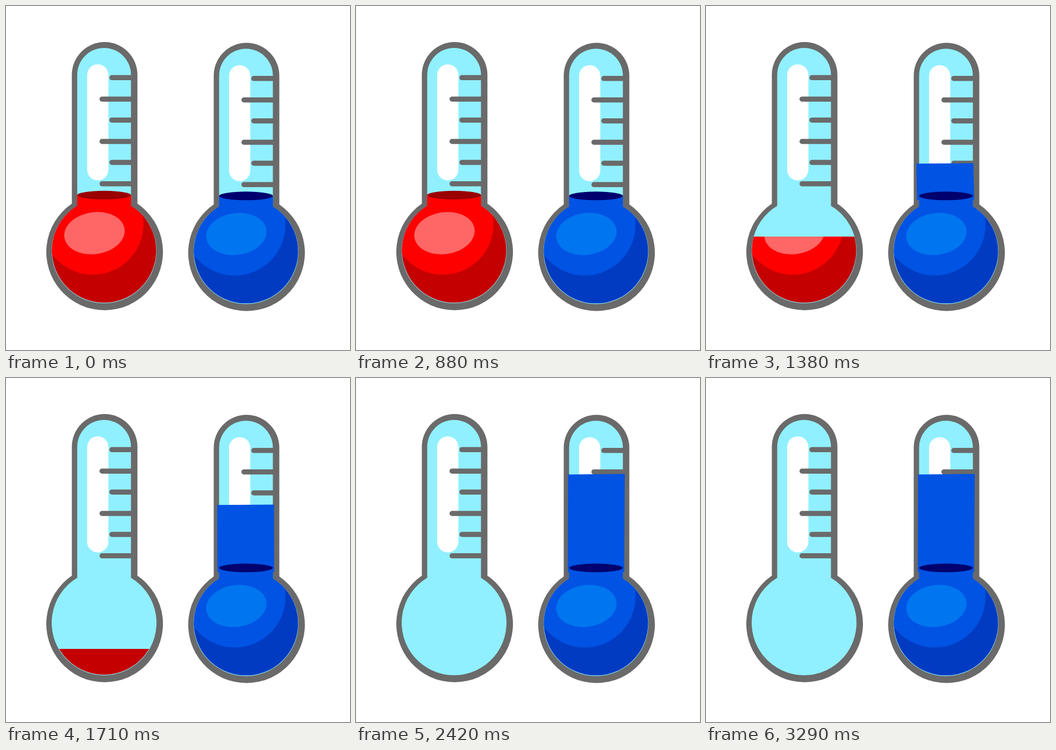
These frames come from a looping animation (640 px wide and 640 px high, 3330 ms). An HTML page:

```html
<!DOCTYPE html>
<html lang="en">
<head>
<meta charset="utf-8">
<title>Two thermometers</title>
<style>
  html, body {
    margin: 0;
    width: 100%;
    height: 100%;
    overflow: hidden;
    background: #fff;
  }
  .layer {
    position: absolute;
    left: 0;
    top: 0;
    width: 640px;
    height: 640px;
  }
  .hot  { --body: #f00; --shade: #c40000; --shine: #f66; --top: #9b0000; }
  .cold { --body: #0053e3; --shade: #003bc2; --shine: #0075f0; --top: #00006e; }

  .drain { animation: drain 3330ms infinite; }
  .column {
    background: #0053e3;
    animation: rise 3330ms infinite;
  }

  /* 25 steps at 24 per second, starting after one second */
  @keyframes drain {
    0% {
      clip-path: inset(340px 0px 0px 0px);
      animation-timing-function: steps(1, end);
    }
    30.03% {
      clip-path: inset(344.6px 0px 0px 0px);
      animation-timing-function: steps(25, end);
    }
    61.26%, 100% { clip-path: inset(579px 0px 0px 0px); }
  }
  @keyframes rise {
    0% {
      clip-path: polygon(392px 361px, 499px 361px, 499px 361px, 392px 361px);
      animation-timing-function: steps(1, end);
    }
    30.03% {
      clip-path: polygon(389.5px 357.4px, 496px 356.5px, 499px 361px, 392px 361px);
      animation-timing-function: steps(25, end);
    }
    61.26%, 100% {
      clip-path: polygon(394.5px 179.4px, 500px 178.4px, 499px 361px, 394px 361px);
    }
  }
</style>
</head>
<body>
<svg class="layer" viewBox="0 0 640 640">
  <defs>
    <g id="glass">
      <path fill="#6a6a6a" d="M122.5 367.8V128a61 61 0 0 1 122 0V367.8A108.5 108.5 0 1 1 122.5 367.8Z"/>
      <path fill="#90f0ff" d="M132.5 371.8V128a50 50 0 0 1 100 0V371.8A97.5 97.5 0 1 1 132.5 371.8Z"/>
      <rect x="151" y="108.5" width="39.5" height="216" rx="19.75" fill="#fff"/>
      <path stroke="#6a6a6a" stroke-width="9.5" stroke-linecap="round"
        d="M197 133.3H232M178.7 173.2H236M197 212.2H232M178.7 252H236M197 291H232M178.7 330.8H236"/>
    </g>
    <clipPath id="fill">
      <path d="M132.5 371.8V352H232.5V371.8A97 97 0 1 1 132.5 371.8Z"/>
    </clipPath>
    <g id="liquid">
      <g clip-path="url(#fill)">
        <rect x="80" y="345" width="210" height="215" fill="var(--shade)"/>
        <circle cx="161.5" cy="405.5" r="94.5" fill="var(--body)"/>
      </g>
      <ellipse rx="56.5" ry="39" transform="translate(164.6 422.6) rotate(-8)" fill="var(--shine)"/>
    </g>
    <ellipse id="surface" cx="182.5" cy="351.8" rx="50" ry="8" fill="var(--top)"/>
  </defs>
  <use href="#glass"/>
  <g class="cold" transform="translate(264 1.5)">
    <use href="#glass"/>
    <use href="#liquid"/>
  </g>
</svg>

<svg class="layer hot drain" viewBox="0 0 640 640">
  <use href="#liquid"/>
  <use href="#surface"/>
</svg>

<div class="layer column"></div>

<svg class="layer cold" viewBox="0 0 640 640">
  <use href="#surface" transform="translate(264 1.5)"/>
</svg>
</body>
</html>
```
